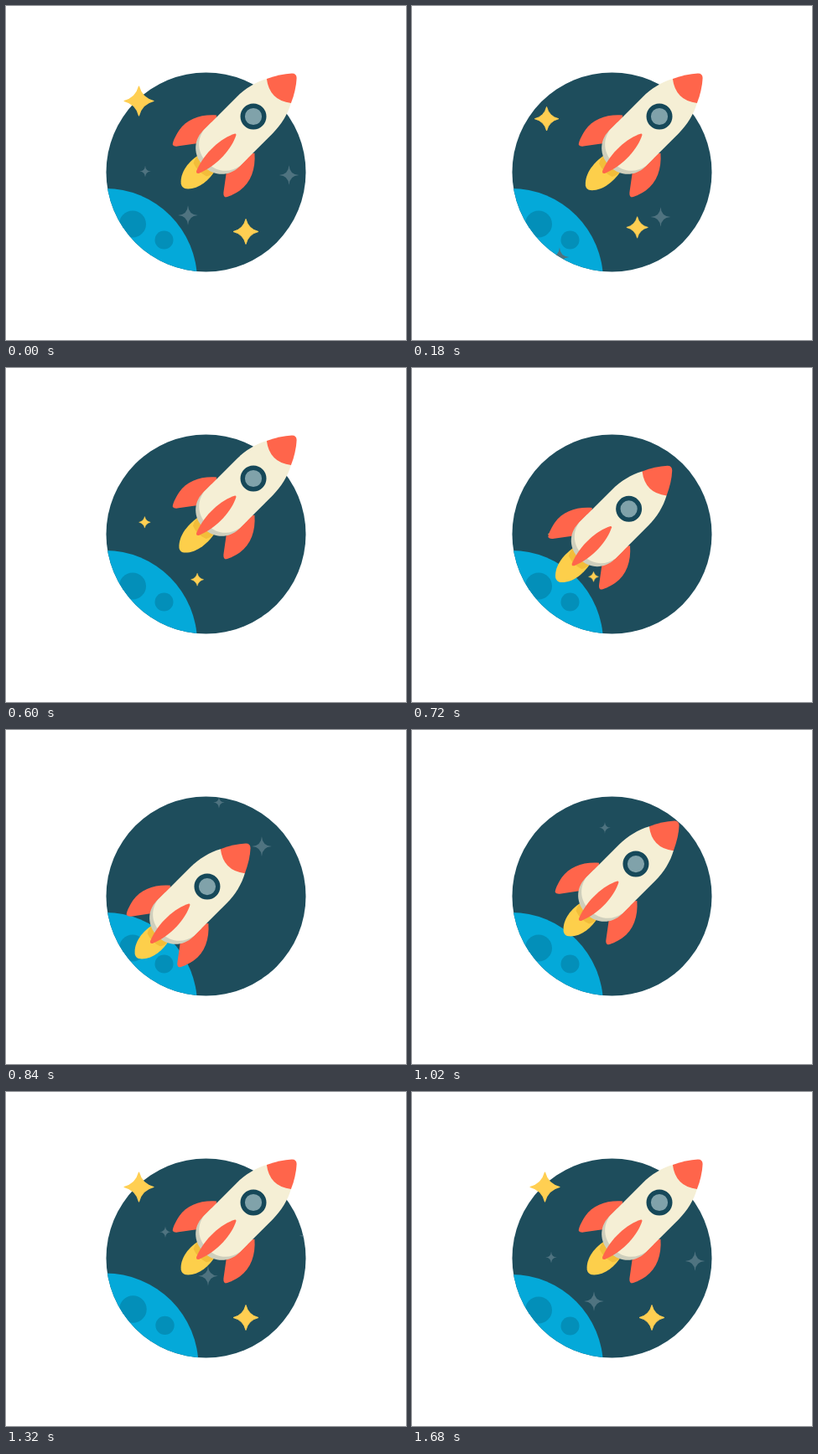
Write an HTML page that moves like this. It is 477 px wide and 399 px high and loops after 1810 ms.

```html
<!DOCTYPE html>
<html lang="en">
<head>
<meta charset="utf-8">
<title>Rocket launch</title>
<style>
  html, body { margin: 0; width: 100%; height: 100%; overflow: hidden; background: #fff; }
  svg { display: block; width: 100%; height: 100%; }
</style>
</head>
<body>
<svg viewBox="0 0 477 399">
  <defs>
    <clipPath id="sky"><circle cx="238.5" cy="198.5" r="119"/></clipPath>
    <path id="fin" d="M-30 -32 C-42 -46 -58 -54 -74 -51 C-83 -49 -90 -46.500 -92 -44 Q-92.500 -41 -88 -38 L-68 -23 L-40 -24 Z"/>
  </defs>
  <circle cx="238.5" cy="198.5" r="119" fill="#1e4d5c"/>
  <g clip-path="url(#sky)">
    <g id="planet">
      <circle cx="118" cy="328" r="110" fill="#04a9d9"/>
      <g fill="#038fb9">
        <circle cx="151" cy="260.5" r="16"/>
        <circle cx="188.5" cy="279.5" r="11"/>
      </g>
    </g>
    <g id="dim" fill="#4f7380"></g>
  </g>
  <g id="bright" fill="#ffcf52" stroke="#ffcf52" stroke-linejoin="round"></g>
  <g id="rocket">
    <g id="flame">
      <path d="M-76 -13 C-92 -17 -109 -15 -118 -4 Q-120.500 0 -118 4 C-109 15 -92 17 -76 13 Z" fill="#fdcf4b"/>
      <path d="M-76 -13 Q-84 -15 -90 -11 Q-94 0 -90 11 Q-84 15 -76 13 Z" fill="#f2bd3a"/>
    </g>
    <g fill="#ff654b">
      <use href="#fin"/>
      <use href="#fin" transform="scale(1 -1)"/>
    </g>
    <path d="M-40 -30.500 H-55 C-72 -30 -84 -17 -84 0 C-84 17 -72 30 -55 30.500 H-40 Z" fill="#cfcfbc"/>
    <path d="M43 -20.500 C31 -27 17 -30.500 2 -30.500 H-53 C-68 -28 -78 -16 -78 0 C-78 16 -68 28 -53 30.500 H2 C17 30.500 31 27 43 20.500 Z" fill="#f5efd5"/>
    <path d="M43 -20.500 C53 -16 62 -10.500 69 -4 Q73 0 69 4 C62 10.500 53 16 43 20.500 Q27 0 43 -20.500 Z" fill="#ff654b"/>
    <circle r="12.800" fill="#80a2aa" stroke="#164859" stroke-width="5.400"/>
    <path d="M-30 -1 Q-29 0 -30 1 C-45 9 -72 11 -94 2 Q-97 0 -94 -2 C-72 -11 -45 -9 -30 -1 Z" fill="#ff654b"/>
  </g>
</svg>
<script>
const LOOP = 1810, STEP = 30;
const byId = id => document.getElementById(id);
const clamp = v => Math.max(0, Math.min(1, v));
const span = (t, from, to) => clamp((t - from) / (to - from));
const pulse = (t, from, to) => Math.sin(Math.PI * span(t, from, to));

// Four-pointed star of unit radius; pinch sets how slim the points are.
const starPath = p =>
  `M0 -1Q${p} ${-p} 1 0Q${p} ${p} 0 1Q${-p} ${p} -1 0Q${-p} ${-p} 0 -1Z`;

function addStar(parent, pinch, star) {
  const node = document.createElementNS("http://www.w3.org/2000/svg", "path");
  node.setAttribute("d", starPath(pinch));
  parent.append(node);
  return { ...star, node };
}

const dimStars = [
  { x: 166, y: 197.5, r: 6.8 },
  { x: 217, y: 250, r: 11.8 },
  { x: 337.5, y: 202, r: 11.8 }
].map(s => addStar(byId("dim"), 0.06, s));

const brightStars = [
  { x: 158.5, y: 113.5, r: 17.5, vx: 0.0115, vy: 0.118, shrink: 0.00102 },
  { x: 286, y: 269.5, r: 15, vx: -0.0965, vy: -0.028, shrink: 0.00083 }
].map(s => addStar(byId("bright"), 0.2, s));
byId("bright").setAttribute("stroke-width", 0.06);

function place(star, dx, dy, scale) {
  star.node.setAttribute("transform",
    `translate(${star.x + dx} ${star.y + dy}) scale(${star.r * scale})`);
}

function rocketOffset(t) {
  if (t < 810) return 59.5 * (1 - Math.cos(Math.PI * span(t, 600, 810))) / 2;
  return 0.15 * Math.max(0, 1207 - t);
}

function draw(t) {
  const leaving = t < 810;
  const left = Math.max(0, 1500 - t);
  const dx = leaving ? -0.228 * t : 0.1333 * left;
  const dy = leaving ? 0.278 * t : -0.168 * left;
  dimStars.forEach(s => place(s, dx, dy, 1));

  brightStars.forEach(s => {
    if (t < 1080) place(s, s.vx * t, s.vy * t, Math.max(0, 1 - s.shrink * t));
    else place(s, 0, 0, span(t, 1080, 1290));
  });

  const d = rocketOffset(t);
  byId("rocket").setAttribute("transform",
    `translate(${295 - d} ${132 + d}) rotate(-45)`);
  const stretch = 1 + 0.11 * pulse(t, 0, 840);
  byId("flame").setAttribute("transform",
    `translate(-80 0) scale(${stretch} 1) translate(80 0)`);

  const swell = 1 + 0.02 * pulse(t, 1200, 1680);
  byId("planet").setAttribute("transform",
    `translate(118 328) scale(${swell}) translate(-118 -328)`);
}

const start = performance.now();
function tick() {
  const elapsed = (performance.now() - start) % LOOP;
  let t = Math.min(1680, Math.floor(elapsed / STEP) * STEP);
  if (t === 870) t = 840; // one pose is held for two steps
  draw(t);
  requestAnimationFrame(tick);
}
tick();
</script>
</body>
</html>
```
